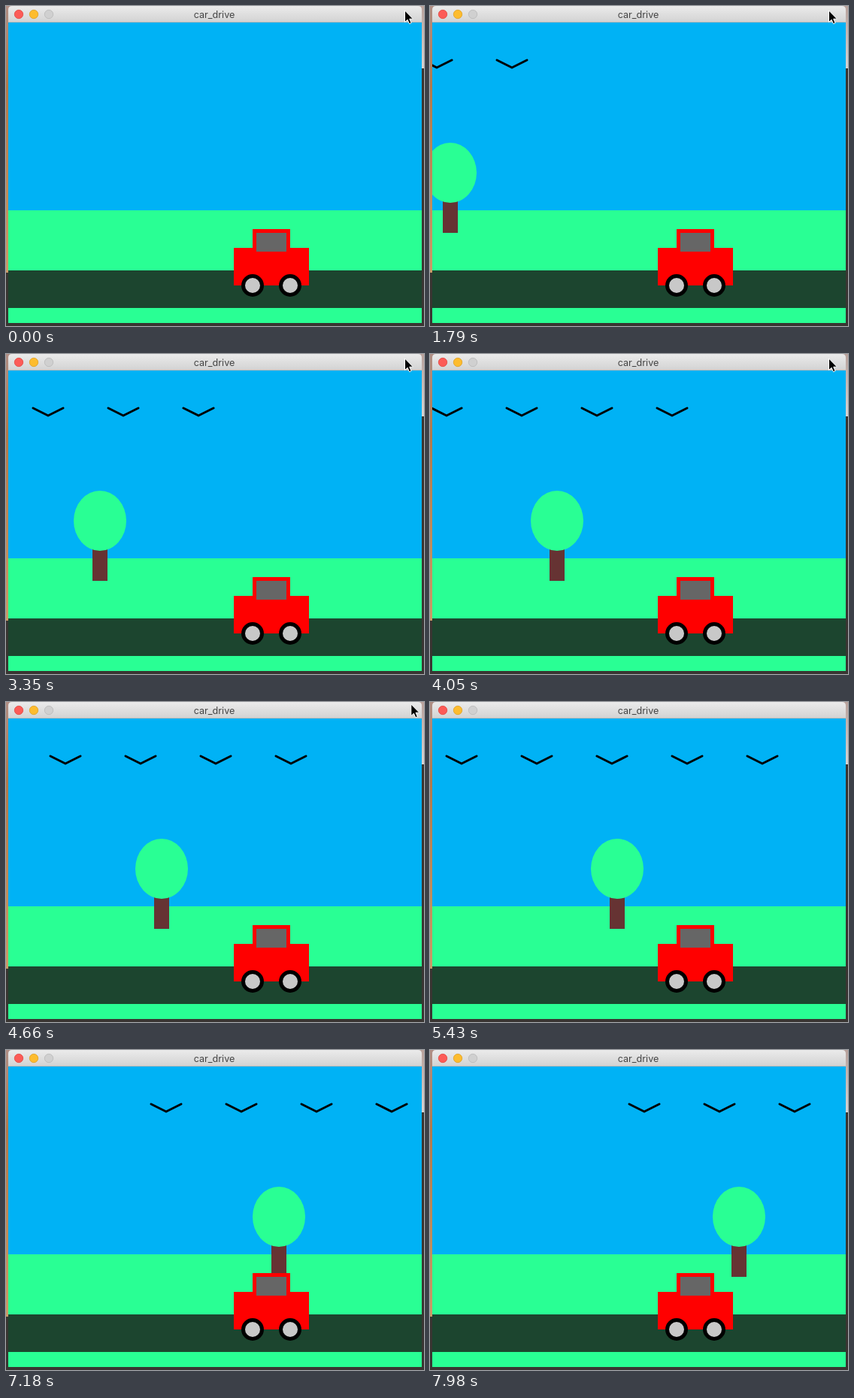
An HTML page for the animation above (8000 ms loop, 556 by 426 pixels).

```html
<!DOCTYPE html>
<html lang="en">
<head>
<meta charset="utf-8">
<title>car_drive</title>
<style>
  html, body { margin: 0; width: 100%; height: 100%; overflow: hidden; }
  svg { display: block; width: 556px; height: 426px; }
  .title { font: 12.6px Inter, Roboto, sans-serif; fill: #444; text-anchor: middle; }
</style>
</head>
<body>
<svg viewBox="0 0 556 426">
  <defs>
    <linearGradient id="bar" x2="0" y2="1">
      <stop stop-color="#ebebeb"/><stop offset="1" stop-color="#d2d2d2"/>
    </linearGradient>
    <linearGradient id="deskLeft" x2="0" y2="1">
      <stop stop-color="#b08f86"/><stop offset=".3" stop-color="#b27a4c"/><stop offset="1" stop-color="#c99a68"/>
    </linearGradient>
    <linearGradient id="deskRight" x2="0" y2="1">
      <stop stop-color="#b9a29c"/><stop offset="1" stop-color="#d6d4d4"/>
    </linearGradient>
    <clipPath id="view"><rect x="3" y="22" width="550" height="400"/></clipPath>
    <path id="bird" d="M-20 72 0 82 20 72"/>
    <circle id="wheel" r="12.5" fill="#c8c8c8" stroke="#000" stroke-width="5"/>
  </defs>

  <!-- desktop behind the window -->
  <rect width="556" height="426" fill="#393532"/>
  <rect width="10" height="355" fill="url(#deskLeft)"/>
  <rect x="546" width="10" height="83" fill="url(#deskRight)"/>

  <!-- title bar -->
  <path d="M3 22V5q0-5 5-5h540q5 0 5 5v17z" fill="url(#bar)"/>
  <rect x="3" y="21" width="550" height="1" fill="#b8b8b8"/>
  <circle cx="17" cy="11" r="5.7" fill="#fc5b57" stroke="#e2463f" stroke-width=".8"/>
  <circle cx="37" cy="11" r="5.7" fill="#fdbc2e" stroke="#dfa023" stroke-width=".8"/>
  <circle cx="57" cy="11" r="5.7" fill="#d0d0d0" stroke="#b9b9b9" stroke-width=".8"/>
  <text class="title" x="277" y="16">car_drive</text>

  <!-- scene -->
  <g clip-path="url(#view)">
    <rect y="22" width="556" height="250" fill="#00b2f5"/>
    <rect y="272" width="556" height="150" fill="#29ff94"/>
    <rect y="352" width="556" height="50" fill="#1c452f"/>
    <g id="birds" fill="none" stroke="#000" stroke-width="3" stroke-linecap="round" stroke-linejoin="round">
      <use href="#bird"/>
      <use href="#bird" x="-100"/>
      <use href="#bird" x="-200"/>
      <use href="#bird" x="-300"/>
      <use href="#bird" x="-400"/>
    </g>
    <g id="tree">
      <rect x="-10" y="252" width="20" height="50" fill="#633"/>
      <ellipse cy="222" rx="35" ry="40" fill="#29ff94"/>
    </g>
    <path d="M303 322h25v-25h50v25h25v50h-100z" fill="#f00"/>
    <rect x="333" y="302" width="40" height="25" fill="#666"/>
    <use href="#wheel" x="328" y="372"/>
    <use href="#wheel" x="378" y="372"/>
  </g>

  <path id="cursor" d="M0 0V15.5L3.6 12.2 6 17.7 8.6 16.6 6.2 11.2H11z"
        fill="#000" stroke="#fff" stroke-width="1" stroke-linejoin="round"/>
</svg>
<script>
  const LOOP = 8000;
  // Start of every run of ten redraws, in ms; the pace drifts slightly.
  const RUNS = [500, 1360, 2220, 3090, 3960, 4830, 5700, 6570, 7450, 8330];
  const [birds, tree, cursor] = ['birds', 'tree', 'cursor'].map(id => document.getElementById(id));

  const moveTo = (part, x, y = 0) => part.setAttribute('transform', `translate(${x} ${y})`);

  // Number of redraws so far, on a 10 ms clock.
  function redrawsAt(ms) {
    const t = Math.floor(ms / 10) * 10 + 7;
    if (t < RUNS[0]) return 0;
    const run = RUNS.findLastIndex(start => start <= t);
    return run * 10 + 1 + Math.floor(10 * (t - RUNS[run]) / (RUNS[run + 1] - RUNS[run]));
  }

  function cursorAt(redraw) {
    if (redraw < 48) return [530.5, 6];
    if (redraw < 51) return [538.8, 3];
    if (redraw < 52) return [547, -4];
    return [600, -40];
  }

  function draw(now) {
    const redraw = redrawsAt(now % LOOP);
    const tick = Math.round(2.7 * redraw + 0.25);  // the scene runs faster than it is redrawn
    moveTo(birds, 3 * tick - 20);
    moveTo(tree, 2 * tick - 59);
    moveTo(cursor, ...cursorAt(redraw));
    requestAnimationFrame(draw);
  }
  draw(performance.now());
</script>
</body>
</html>
```
